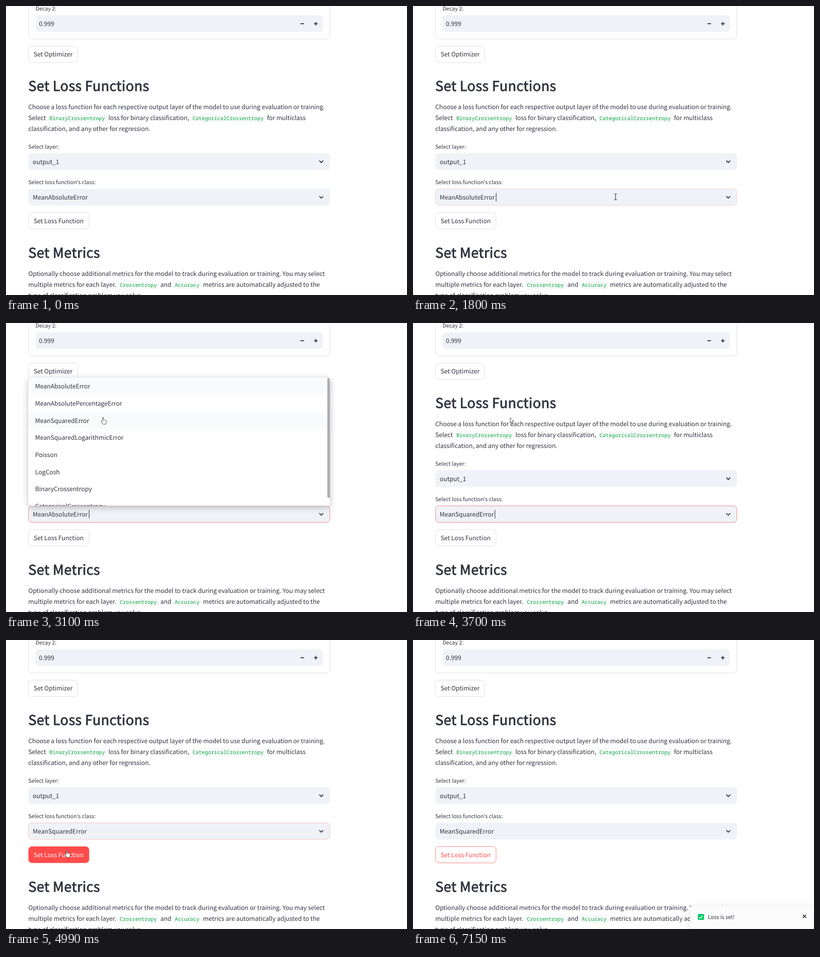
An HTML page for the animation above (7630 ms loop, 881x636 px).

```html
<!DOCTYPE html>
<html lang="en">
<head>
<meta charset="utf-8">
<title>Set loss function</title>
<style>
  html, body { margin: 0; width: 100%; height: 100%; overflow: hidden; background: #fff; }
  svg { display: block; width: 881px; height: 636px; }
  text {
    font: 13.47px "Noto Sans CJK JP", "Noto Sans CJK SC", "Noto Sans CJK", "Noto Sans", sans-serif;
    fill: #31333f; white-space: pre; text-rendering: geometricPrecision;
  }
  .label { font-size: 11.79px; }
  .title { font-size: 30px; letter-spacing: .38px; stroke: #31333f; stroke-width: .9px; }
  .code { font: 11.3px "Noto Sans Mono", "DejaVu Sans Mono", monospace; fill: #09ab3b; }
  .chip { fill: #f8f9fb; }
  .field { fill: #eff2f6; }
  .outline { fill: #fff; stroke: #dfdfe3; }
  .icon { fill: none; stroke: #31333f; stroke-width: 2; }
  .pop { fill: #fff; filter: drop-shadow(0 3px 7px rgba(0, 0, 0, .25)); }
  .toast { fill: #fbfbfc; filter: drop-shadow(0 3px 7px rgba(49, 51, 63, .16)); }
  .row { fill: #f9fafb; }
  #cursor path { fill: #fff; stroke: #33343c; stroke-width: .9; stroke-linejoin: round; }
  #cursor #beam { fill: none; stroke-width: 1.2; }
</style>
</head>
<body>
<svg viewBox="0 0 881 636">
  <defs>
    <clipPath id="listClip"><rect x="49" y="120" width="663" height="282.5" rx="7.5"/></clipPath>
  </defs>

  <rect class="outline" x="49.5" y="-40" width="662" height="112.5" rx="7.5"/>
  <text class="label" x="65" y="10">Decay 2:</text>
  <rect class="field" x="65" y="20.5" width="631" height="36.5" rx="7.5"/>
  <text x="72.3" y="44.3">0.999</text>
  <path class="icon" d="M647 39h7.7M676.8 39h7.7M680.65 35.2v7.7"/>

  <rect class="outline" x="49.5" y="88.5" width="108" height="36" rx="7.5"/>
  <text x="60.7" y="111.4">Set Optimizer</text>

  <text class="title" x="49.1" y="187">Set Loss Functions</text>
  <g id="lossCopy"></g>

  <text class="label" x="49" y="313.8">Select layer:</text>
  <rect class="field" x="49" y="324" width="663" height="36.8" rx="7.5"/>
  <text x="58.8" y="347.6">output_1</text>
  <path class="icon" d="M688.4 340.2l4.3 4.3 4.3-4.3"/>

  <text class="label" x="49" y="392.2">Select loss function's class:</text>
  <rect class="field" x="49" y="402.2" width="663" height="36.8" rx="7.5"/>
  <rect id="focus" x="49.5" y="402.5" width="662" height="36.2" rx="7.5" fill="none" stroke="#f58080"/>
  <text id="chosen" x="58.8" y="426.3"></text>
  <rect id="caret" y="411.5" width="1.2" height="18.5" fill="#31333f"/>
  <path class="icon" d="M688.4 418.6l4.3 4.3 4.3-4.3"/>

  <rect id="button" class="outline" x="49.5" y="454.5" width="133" height="36" rx="7.5"/>
  <text id="buttonText" x="60.7" y="477.8">Set Loss Function</text>

  <text class="title" x="49.1" y="553.6">Set Metrics</text>
  <g id="metricCopy"></g>

  <g id="list">
    <rect class="pop" x="49" y="120" width="663" height="282.5" rx="7.5"/>
    <g clip-path="url(#listClip)">
      <rect class="row" x="49" y="120" width="663" height="37.7"/>
      <rect id="hover" class="row" x="49" width="663" height="37.7"/>
      <g id="options"></g>
      <rect id="thumb" x="706" y="120.5" width="5.7" height="264.5" rx="2.8" fill="#adadb2"/>
    </g>
  </g>

  <g id="toast">
    <rect class="toast" x="608.5" y="584" width="272" height="51.5" rx="7.5"/>
    <rect x="626" y="603" width="13.5" height="13" rx="1.5" fill="#00c95f"/>
    <path d="M628.8 609.8l2.8 2.9 5-6.2" fill="none" stroke="#fff" stroke-width="1.7"/>
    <text class="label" x="648" y="614">Loss is set!</text>
    <path class="icon" d="M856.6 604.6l7 7m0-7l-7 7"/>
  </g>

  <g id="cursor">
    <path id="arrow" d="M.5 .5v11.6l2.7-2.5 1.8 4 1.9-.9-1.8-3.9h3.6z"/>
    <path id="beam" d="M-3.3-6.5h2.3q1 0 1 1v11q0 1-1 1h-2.3M3.3-6.5H1q-1 0-1 1M3.3 6.5H1q-1 0-1-1"/>
    <path id="hand" d="M-1 8.4V.6q0-1.1 1-1.1t1 1.1v4.6q1.5-.9 2.2.5 1.5-.7 2.1.6 2-.5 2 1.5v3.4l-1.3 3.6H.4l-4-5.2q-.9-1.6 .6-1.8z"/>
  </g>
</svg>

<script>
const LOOP = 7630, ROW = 37.67, LINE = 24.07;
const $ = id => document.getElementById(id);

function add(parent, tag, attrs, text) {
  const node = document.createElementNS('http://www.w3.org/2000/svg', tag);
  for (const key in attrs) node.setAttribute(key, attrs[key]);
  if (text) node.textContent = text;
  parent.append(node);
}

// Each run is [x, text, isCode].
function paragraph(parent, top, lines) {
  lines.forEach((runs, i) => runs.forEach(([x, text, isCode]) => {
    const y = top + i * LINE;
    if (isCode) {
      add(parent, 'rect', { class: 'chip', x: x - 4.5, y: y - 13.5, width: text.length * 6.78 + 9, height: 18.8, rx: 3.8 });
    }
    add(parent, 'text', { x, y, class: isCode ? 'code' : 'body' }, text);
  }));
}

paragraph($('lossCopy'), 227.2, [
  [[49, 'Choose a loss function for each respective output layer of the model to use during evaluation or training.']],
  [[49, 'Select'], [95.3, 'BinaryCrossentropy', true], [225, 'loss for binary classification,'],
   [409.8, 'CategoricalCrossentropy', true], [573.5, 'for multiclass']],
  [[49, 'classification, and any other for regression.']]
]);
paragraph($('metricCopy'), 594, [
  [[49, 'Optionally choose additional metrics for the model to track during evaluation or training. You may select']],
  [[49, 'multiple metrics for each layer.'], [250, 'Crossentropy', true], [339.2, 'and'],
   [370.7, 'Accuracy', true], [432.7, 'metrics are automatically adjusted to the']],
  [[49, 'type of classification problem you solve.']]
]);

['MeanAbsoluteError', 'MeanAbsolutePercentageError', 'MeanSquaredError', 'MeanSquaredLogarithmicError',
 'Poisson', 'LogCosh', 'BinaryCrossentropy', 'CategoricalCrossentropy']
  .forEach((name, i) => add($('options'), 'text', { x: 64, y: 144.2 + i * ROW }, name));

// Pointer hotspot: [ms, x, y]
const path = [
  [580, 826, 624], [920, 14, 540], [1180, 380, 432], [1310, 445, 420],
  [2100, 445, 420], [2280, 391.8, 346], [2345, 391.8, 346], [2560, 300, 262], [2900, 218, 202],
  [2970, 217, 201], [3100, 213, 208], [3770, 213, 208], [4100, 246, 330], [4310, 250, 424],
  [4380, 215, 440], [4450, 152, 459.5], [4515, 152, 459.5], [4720, 133.5, 463.5],
  [5700, 133.5, 463.5], [6010, 371, 468], [6100, 390, 467], [6410, 702, 490],
  [6780, 702, 490], [7150, 862, 650]
];

const within = (t, from, to) => t >= from && t < to;
const ramp = (t, from, to) => Math.min(1, Math.max(0, (t - from) / (to - from)));
const show = (id, on) => $(id).setAttribute('visibility', on ? 'inherit' : 'hidden');
const fade = (id, amount) => $(id).setAttribute('opacity', amount);

function pointerAt(t) {
  const i = path.findIndex(p => p[0] > t);
  if (i < 1) return null;
  const [a, b] = [path[i - 1], path[i]];
  const k = ramp(t, a[0], b[0]);
  return { x: a[1] + (b[1] - a[1]) * k, y: a[2] + (b[2] - a[2]) * k };
}

function pointerKind({ x, y }, listOpen) {
  const over = (x0, y0, x1, y1) => x >= x0 && x <= x1 && y >= y0 && y <= y1;
  if (listOpen && over(49, 120, 712, 402)) return 'hand';
  if (over(49, 454, 183, 491)) return 'hand';
  const onText = over(49, 210, 701, 282) || over(49, 324, 712, 361) || over(49, 402, 712, 439) || over(49, 577, 701, 636);
  return onText ? 'beam' : 'arrow';
}

function draw(t) {
  const picked = t >= 3570;
  const listOpen = within(t, 1870, 3640);
  const pointer = pointerAt(t);

  fade('focus', t < 1740 ? 0 : t < 1800 ? .12 : t < 1870 ? .3 : 1 - ramp(t, 4900, 5060));
  $('chosen').textContent = picked ? 'MeanSquaredError' : 'MeanAbsoluteError';
  $('caret').setAttribute('x', picked ? 179.4 : 182);
  show('caret', within(t, 1740, 2420) || within(t, 2900, 3430) || within(t, 3570, 4100) || within(t, 4600, 4920));

  fade('list', Math.min(ramp(t, 1830, 2010), 1 - ramp(t, 3550, 3690)));
  show('list', within(t, 1840, 3690));

  const hovering = listOpen && pointer && pointer.y < 402;
  show('hover', hovering);
  show('thumb', hovering);
  if (hovering) $('hover').setAttribute('y', 120 + Math.floor((pointer.y - 119.9) / ROW) * ROW);

  const pressed = within(t, 4920, 5060), active = t >= 4400;
  $('button').style.fill = pressed ? '#ff4b4b' : '#fff';
  $('button').style.stroke = active ? '#ff7c7c' : '';
  $('buttonText').style.fill = pressed ? '#fff' : active ? '#ff4b4b' : '';

  fade('toast', ramp(t, 5240, 5520));

  show('cursor', pointer);
  if (pointer) {
    const kind = pointerKind(pointer, listOpen);
    for (const id of ['arrow', 'beam', 'hand']) show(id, id === kind);
    $('cursor').setAttribute('transform', `translate(${pointer.x} ${pointer.y})`);
  }
}

const start = performance.now();
function tick() {
  draw((performance.now() - start) % LOOP);
  requestAnimationFrame(tick);
}
tick();
</script>
</body>
</html>
```
